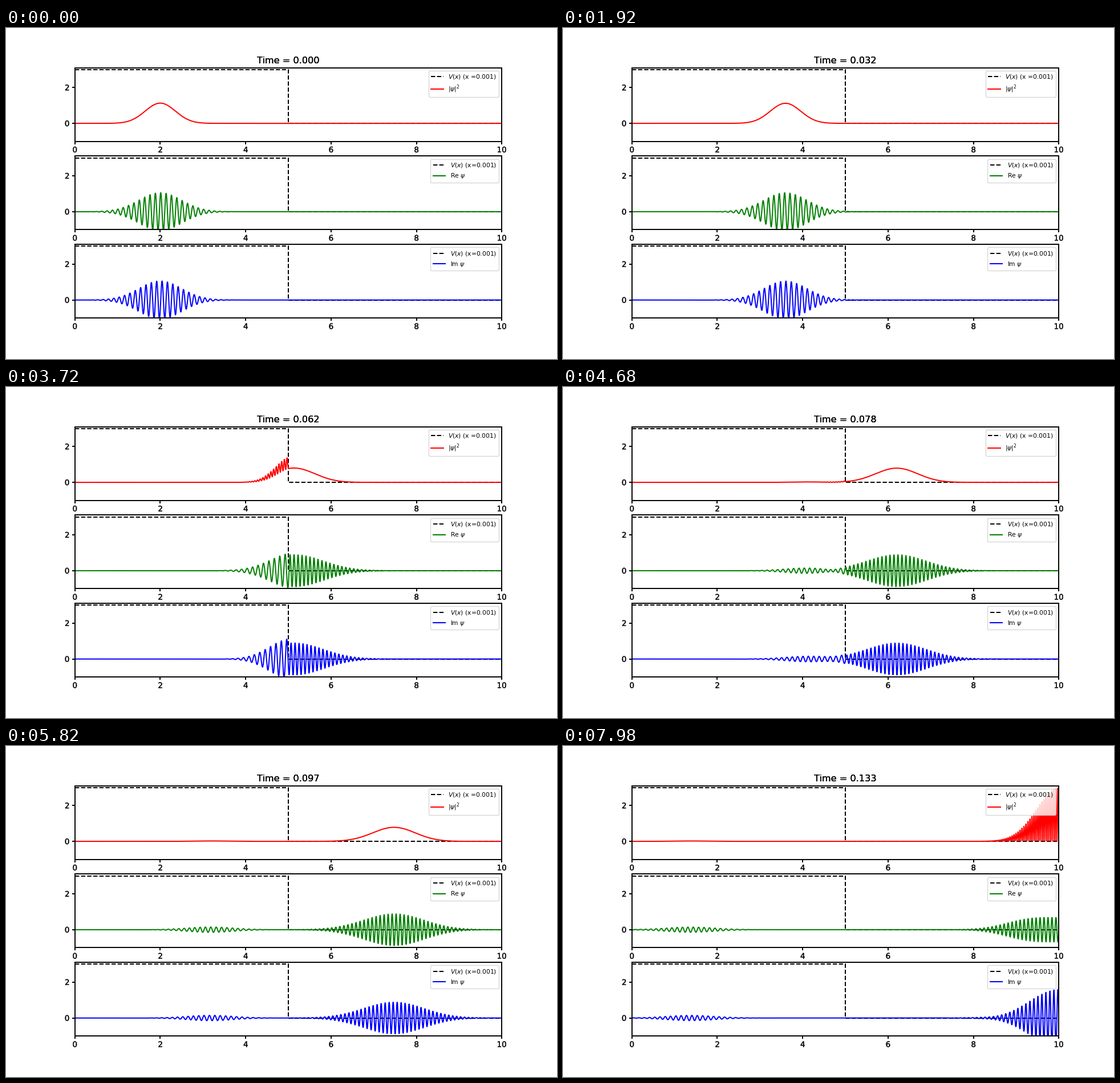
A matplotlib script that plays this animation: 966x580 px, repeating every 8000 ms.

```python
import numpy as np
import matplotlib.pyplot as plt
from matplotlib.animation import FuncAnimation
from matplotlib.patches import PathPatch
from matplotlib.path import Path
from matplotlib.textpath import TextPath
from matplotlib.transforms import IdentityTransform

W, H, DPI = 966, 580, 64
PX = 96.6 / 72          # pixels per layout point
PT = 96.6 / DPI         # layout points to figure points
TICK_MS, HOLD, FRAMES = 20, 3, 400

# Gaussian packet meeting a downward potential step at x = 5, walls at 0 and 10
X0, K0, SIGMA, STEP, WALL = 2.0, 50.0, 0.5, 5.0, 10.0
V0, DX, DT = 1000.0, 0.002, 0.001

plt.rcParams.update({
    "font.family": "DejaVu Sans",
    "font.size": 10 * PT,
    "lines.linewidth": 1.5 * PT,
    "patch.linewidth": 1.0 * PT,
    "axes.linewidth": 1.45 * PT,
})

x = np.linspace(0, WALL, 2501)
k = np.linspace(K0 - 13, K0 + 13, 161)


def scattering_states():
    """Energies and weighted stationary states on a grid of spacing DX."""
    energy = (1 - np.cos(k * DX)) / DX**2 + V0
    q = np.arccos(1 - energy * DX**2) / DX
    r = (k - q) / (k + q)
    t = 2 * k / (k + q)
    norm = (np.pi * SIGMA**2) ** -0.25 * SIGMA / np.sqrt(2 * np.pi)
    weight = norm * np.exp(-((k - K0) * SIGMA) ** 2 / 2) * (k[1] - k[0])
    weight = weight * np.exp(1j * (K0 - k) * X0)

    xs = x[:, None]
    back = r * np.exp(2j * k * STEP)
    left = np.exp(1j * k * xs) + back * (np.exp(-1j * k * xs) - np.exp(1j * k * xs))
    right = t * np.exp(1j * k * STEP) * (
        np.exp(1j * q * (xs - STEP)) - np.exp(1j * q * (2 * WALL - STEP - xs)))
    return energy, np.where(xs < STEP, left, right) * weight


energy, states = scattering_states()
times = np.arange((FRAMES - 1) // HOLD + 1) * DT
psi = (states @ np.exp(-1j * np.outer(energy, times))).T

fig, axes = plt.subplots(3, 1, figsize=(W / DPI, H / DPI), dpi=DPI, facecolor="white")
fig.subplots_adjust(left=0.125, right=0.9, top=0.88, bottom=0.124, hspace=0.2)


def glyphs(text, cx, cy):
    """Outline of text centred on a pixel position."""
    path = TextPath((0, 0), text, size=10 * PX)
    box = path.get_extents()
    shift = np.array([cx - (box.x0 + box.x1) / 2, cy - (box.y0 + box.y1) / 2])
    return Path(path.vertices + shift, path.codes)


def add_ticks(ax):
    xt, yt = [0, 2, 4, 6, 8, 10], [0, 2]
    style = dict(color="black", ls="none", ms=3.5 * PT, mew=1.45 * PT, clip_on=False)
    ax.plot(xt, [-1] * len(xt), marker=3, **style)
    ax.plot([0] * len(yt), yt, marker=0, **style)
    to_px = ax.transData.transform
    outlines = []
    for v in xt:
        px, py = to_px((v, -1))
        outlines.append(glyphs(str(v), px, py - 7 * PX - 5))
    for v in yt:
        px, py = to_px((0, v))
        outlines.append(glyphs(str(v), px - 7 * PX - 4.3, py))
    fig.add_artist(PathPatch(Path.make_compound_path(*outlines), fc="black", ec="black",
                             lw=0.5 * 72 / DPI, transform=IdentityTransform()))


def add_panel(ax, color, v_label, label):
    ax.set(xlim=(0, WALL), ylim=(-1, 3.1), xticks=[], yticks=[])
    ax.plot([0, STEP, STEP, WALL], [3, 3, 0, 0], "k--", label=v_label)
    line, = ax.plot(x, 0 * x, color=color, label=label)
    ax.legend(loc="upper right", fontsize=8 * PT)
    add_ticks(ax)
    return line


lines = [
    add_panel(axes[0], "red", r"$V(x)$ (x =0.001)", r"$|\psi|^2$"),
    add_panel(axes[1], "green", r"$V(x)$ (x=0.001)", r"Re $\psi$"),
    add_panel(axes[2], "blue", r"$V(x)$ (x=0.001)", r"Im $\psi$"),
]

# Stacked copies give the title its heavy edges
top = axes[0].get_position()
titles = [fig.text((top.x0 + top.x1) / 2, top.y1 + 6 * PX / H, "", size=12 * PT,
                   ha="center", va="baseline") for _ in range(3)]


def update(frame):
    n = frame // HOLD
    wave = psi[n]
    for line, y in zip(lines, (np.abs(wave) ** 2, wave.real, wave.imag)):
        line.set_ydata(y)
    for title in titles:
        title.set_text(f"Time = {times[n]:.3f}")
    return lines + titles


anim = FuncAnimation(fig, update, frames=FRAMES, interval=TICK_MS,
                     init_func=lambda: update(0), repeat=True, repeat_delay=0)
plt.show()
```
